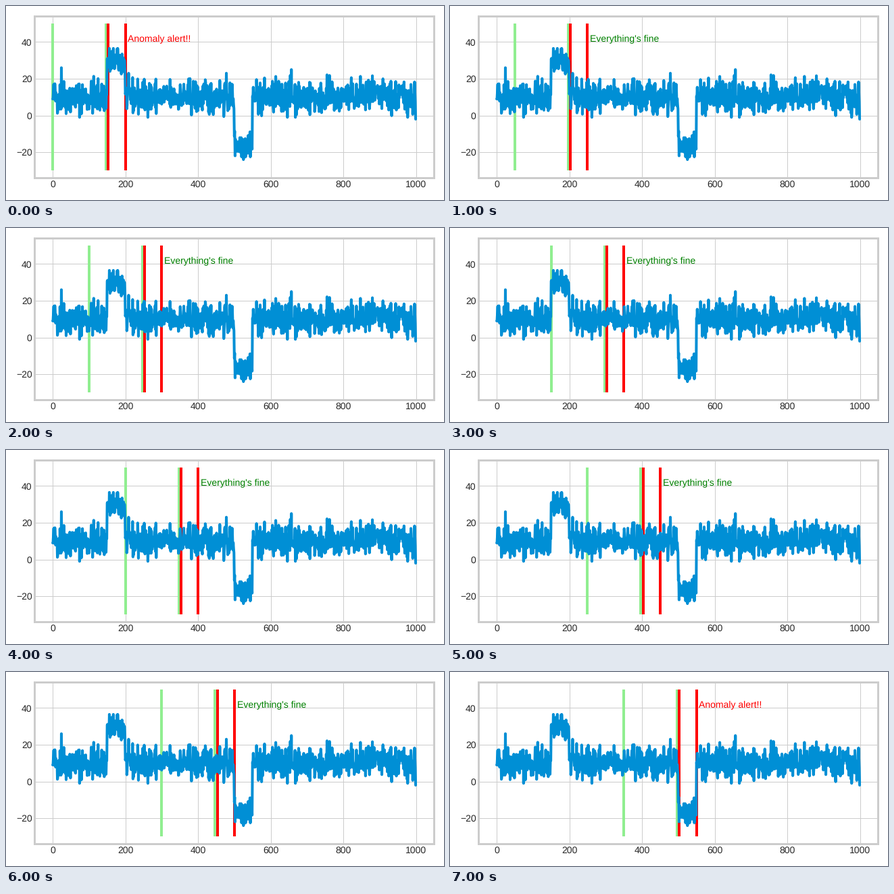
These frames come from a looping animation (648 px wide and 288 px high, 8000 ms). A matplotlib script:

```python
import numpy as np
import matplotlib.pyplot as plt
from matplotlib.animation import FuncAnimation

W, H, DPI = 648, 288, 72
STEP, REF, TEST, FRAMES = 50, 150, 50, 8
GAP = 3            # distance of the inner markers from the shared window edge
THRESHOLD = 10     # mean shift that raises the alert

plt.rcParams.update({
    "font.family": "Liberation Sans",
    "font.size": 14,
    "text.hinting": "none",
    "axes.edgecolor": "0.8",
    "axes.linewidth": 3,
    "axes.axisbelow": True,
    "grid.color": "0.8",
    "grid.linewidth": 1,
    "text.color": "0.15",
    "xtick.color": "0.15",
    "ytick.color": "0.15",
})


def make_signal():
    """Noise around 10 with one raised and one lowered stretch."""
    rng = np.random.RandomState(42)
    level = np.full(1000, 10.0)
    level[150:200] = 29.5
    level[500:550] = -15.5
    noise = np.clip(rng.normal(0, 4.6, 1000), -11, 13)
    noise[150:200] = noise[150:200].clip(-11, 7)
    noise[500:550] = noise[500:550].clip(-7, 7)
    y = level + noise
    # ends and outermost spikes
    for i, value in ((0, 9), (24, 26), (525, -24), (657, 25), (999, -2)):
        y[i] = value
    return y


signal = make_signal()

fig = plt.figure(figsize=(W / DPI, H / DPI), dpi=DPI, facecolor="white")
left, right, top, bottom = 42.2, 632.9, 15.1, 255.4
ax = fig.add_axes([left / W, 1 - bottom / H, (right - left) / W, (bottom - top) / H])
ax.set_xlim(-49.95, 1048.95)
ax.set_ylim(-34, 54)
ax.set_xticks(range(0, 1001, 200))
ax.set_yticks(range(-20, 41, 20))
ax.tick_params(length=0, pad=3.5)
ax.grid(True)

ax.plot(signal, color="#008fd5", lw=4, solid_capstyle="round",
        solid_joinstyle="round", zorder=2)


def marker(color):
    return ax.vlines(0, -30, 50, colors=color, lw=4, zorder=1)


markers = [marker(c) for c in ("lightgreen", "lightgreen", "red", "red")]
label = ax.text(0, 40, "", fontsize=14)


def update(frame):
    start = frame * STEP
    mid = start + REF
    end = mid + TEST
    for line, x in zip(markers, (start, mid - GAP, mid + GAP, end)):
        line.set_segments([[(x, -30), (x, 50)]])

    shift = abs(signal[mid:end].mean() - signal[start:mid].mean())
    alert = shift > THRESHOLD
    label.set_text("Anomaly alert!!" if alert else "Everything's fine")
    label.set_color("red" if alert else "green")
    label.set_x(end + 7)
    return [*markers, label]


anim = FuncAnimation(fig, update, frames=FRAMES, interval=1000, repeat=True,
                     repeat_delay=0, blit=False)
plt.show()
```
